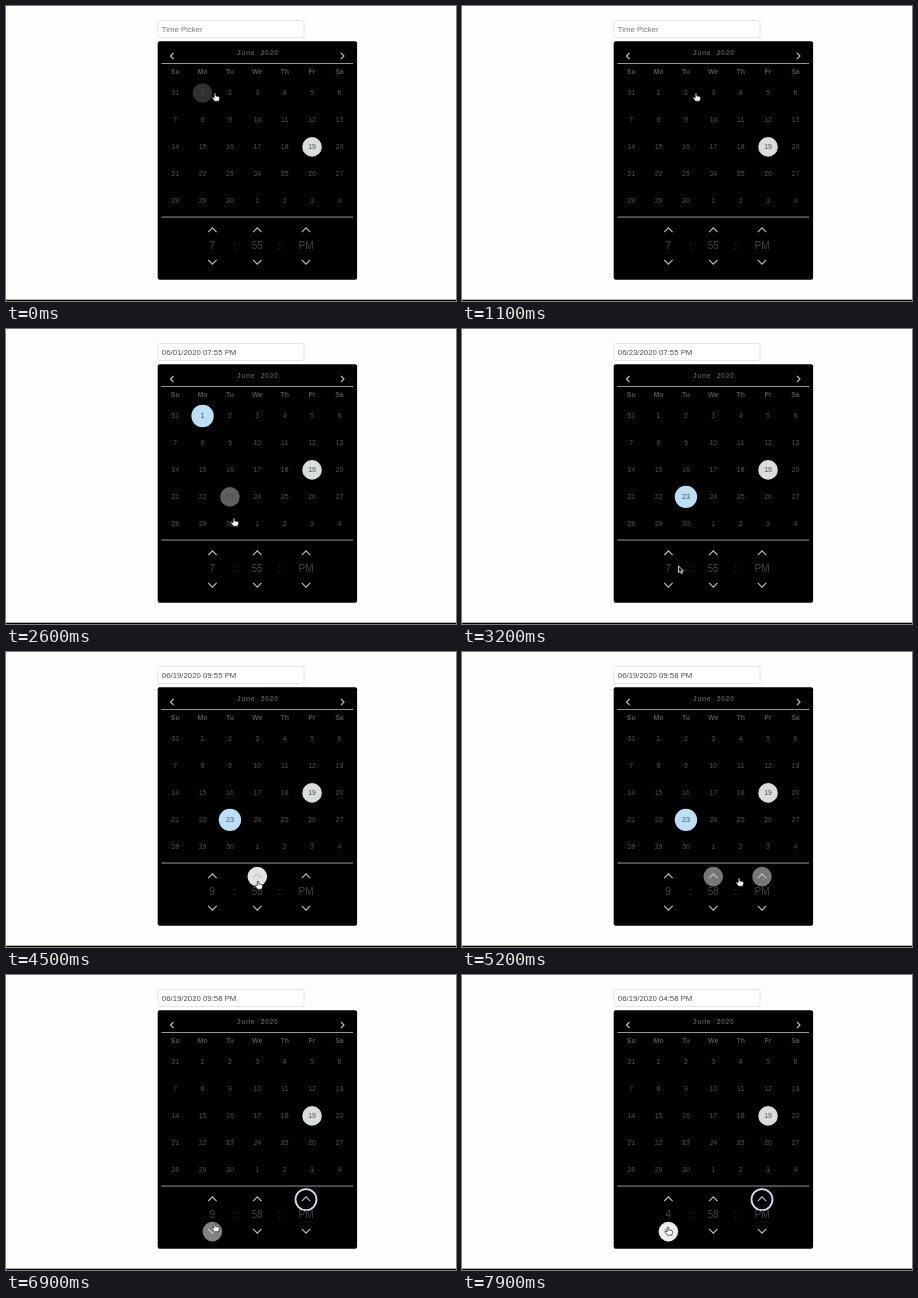
Animation, 450 px wide and 295 px high, one loop 8000 ms. Source, as an HTML page:

```html
<!DOCTYPE html>
<html lang="en">
<head>
<meta charset="utf-8">
<title>Time picker</title>
<style>
  html, body { margin: 0; width: 100%; height: 100%; overflow: hidden; background: #fefefe; }
  svg { display: block; width: 450px; height: 295px; }
  text { font: 7px "Liberation Sans", Arial, sans-serif; fill: #505050; text-anchor: middle; white-space: pre; }
  .bold { font-weight: bold; }
  .big { font-size: 10px; fill: #444; }
  #field { font-size: 7.8px; text-anchor: start; }
  .chevron { fill: none; stroke: #c4c4c4; stroke-width: 1.1; }
</style>
</head>
<body>
<svg id="stage" viewBox="0 0 450 295"></svg>
<script>
const stage = document.getElementById('stage');

function add(tag, attrs, label = '') {
  const el = document.createElementNS('http://www.w3.org/2000/svg', tag);
  for (const key in attrs) el.setAttribute(key, attrs[key]);
  el.textContent = label;
  stage.append(el);
  return el;
}
const text = (x, y, label, cls = '', extra = {}) => add('text', { x, y, class: cls, ...extra }, label);
const chevron = (x, y, dx, dy) => add('path', {
  class: 'chevron',
  d: dx ? `M${x - dx / 2} ${y - 3}l${dx} 3l${-dx} 3` : `M${x - 4.2} ${y - dy / 2}l4.2 ${dy}l4.2 ${-dy}`
});
const disc = (x, y, r, fill) => add('circle', { cx: x, cy: y, r, fill });

// Field, panel and rules
add('rect', { x: 152, y: 14.5, width: 146, height: 17, rx: 2, fill: '#fff', stroke: '#dcdfe2', 'stroke-width': .8 });
add('rect', { x: 151.7, y: 35.3, width: 199.4, height: 238.5, rx: 2 });
add('rect', { y: 293.7, width: 450, height: 1.3 });
for (const y of [57, 210.6]) add('rect', { x: 155.5, y, width: 191.5, height: .9, fill: '#a8a8a8' });

const column = i => 169.2 + i * 27.37;
const row = i => 87 + i * 26.95;
const [hourX, minuteX, halfX, upY, downY] = [206.4, 251.3, 300, 224.6, 256.6];

// Hover discs: [x, y, [time, opacity]...]
const hovers = [
  [column(1), row(0), [0, .2], [700, .2], [900, 0], [1300, 0], [1800, 1], [2400, 1], [2800, .2], [3000, 0]],
  [column(2), row(3), [2400, 0], [2900, 1], [3100, 1], [3500, 0]],
  [hourX, upY, [3200, 0], [3700, 1], [4100, 1], [4400, 0]],
  [minuteX, upY, [4100, 0], [4500, .95], [4700, 1], [5000, 1], [5400, 0]],
  [halfX, upY, [5000, 0], [5400, 1], [6100, 1], [6500, 0]],
  [hourX, downY, [6600, 0], [6900, .55], [7300, 1]]
].map(([x, y, ...keys]) => ({ el: disc(x, y, 9.8, '#eee'), keys }));

disc(column(5), row(2), 9.8, '#d8dcdb');

// Focus marks: shown from one time until another
const dayMark = (col, line, from, to) => ({ el: disc(column(col), row(line), 11.2, '#bcdff8'), from, to });
const marks = [dayMark(1, 0, 2000, 3000), dayMark(2, 3, 3000, 5600)];
const ring = disc(halfX, upY, 10.5, 'none');
ring.setAttribute('stroke', '#cfe3f5');
ring.setAttribute('stroke-width', 1.8);
marks.push({ el: ring, from: 5700, to: 8000 });

// Calendar
text(240, 49.2, 'June', 'bold', { 'font-size': 7, 'letter-spacing': .5 });
text(263.5, 49.2, '2020', 'bold', { 'letter-spacing': .5 });
['Su', 'Mo', 'Tu', 'We', 'Th', 'Fr', 'Sa'].forEach((day, i) => text(column(i), 68, day, 'bold'));
for (let i = 0; i < 35; i++) {
  const day = i === 0 ? 31 : (i - 1) % 30 + 1;
  text(column(i % 7), row(Math.floor(i / 7)) + 2.3, day);
}
chevron(166, 50, -3, 0);
chevron(336.5, 50, 3, 0);

// Time row
for (const x of [hourX, minuteX, halfX]) {
  chevron(x, 224, 0, -4.2);
  chevron(x, 256, 0, 4.2);
}
const hourText = text(hourX, 243.4, '', 'big');
const minuteText = text(minuteX, 243.4, '', 'big');
const halfText = text(halfX, 243.4, '', 'big');
for (const x of [229, 274]) text(x, 243.4, ':', 'big');
const field = text(155.8, 25.8, '', '', { id: 'field' });

// Pointer
const hand = add('path', {
  d: 'M-.8 .6Q0 -.6 .8 .6V3L3.8 3.6Q4.8 4 4.5 5.5L3.8 8.2H-.5L-3.2 4.8Q-3 3.5-1.8 4.2L-.8 5Z',
  fill: '#fff', stroke: '#222', 'stroke-width': .7
});
const arrow = add('path', {
  d: 'M0 0V6.6L1.6 5.2L2.8 7.6L4 7L2.9 4.8H5Z',
  fill: '#111', stroke: '#fff', 'stroke-width': .8
});
const path = [
  [0, 209, 87], [700, 209, 87], [900, 229, 87.5], [1000, 229, 87.5], [1100, 234, 87], [1400, 215, 86],
  [1700, 194.5, 84.5], [2000, 193.5, 84.5], [2200, 220, 100], [2400, 234, 150], [2600, 228, 189],
  [2900, 225, 168], [3000, 225, 171], [3200, 216.5, 237], [3400, 208, 225], [3700, 206, 223],
  [4100, 206, 224], [4400, 250, 228], [4500, 252, 229], [5000, 252, 228], [5400, 302, 224],
  [5800, 302.5, 225], [6100, 302.5, 225], [6400, 219, 232.5], [6700, 210, 246], [6900, 208.8, 248.5],
  [7300, 206, 252]
];

// Linear interpolation of one column of a key list
function sample(keys, t, col = 1) {
  const next = keys.findIndex(key => key[0] > t);
  if (next === 0) return keys[0][col];
  if (next < 0) return keys[keys.length - 1][col];
  const a = keys[next - 1], b = keys[next];
  return a[col] + (b[col] - a[col]) * (t - a[0]) / (b[0] - a[0]);
}
const clicks = (t, ...times) => times.filter(time => t >= time).length;

function draw(t) {
  for (const { el, keys } of hovers) el.setAttribute('opacity', sample(keys, t));
  for (const { el, from, to } of marks) el.setAttribute('opacity', +(t >= from && t < to));

  const hour = 7 + clicks(t, 3800, 4000) - clicks(t, 7400, 7500, 7700, 7800, 7900);
  const minute = 55 + clicks(t, 4700, 4800, 5000);
  const half = t >= 5900 && t < 6200 ? 'AM' : 'PM';
  const day = t < 2900 ? '01' : t < 3800 ? '23' : '19';
  hourText.textContent = hour;
  minuteText.textContent = minute;
  halfText.textContent = half;
  field.textContent = t < 1900 ? 'Time Picker' : `06/${day}/2020 0${hour}:${minute} ${half}`;
  field.style.fill = t < 1900 ? '#777' : '#495057';

  const x = sample(path, t, 1), y = sample(path, t, 2);
  const overLabels = y > 231 && y < 247;
  for (const [el, shown] of [[hand, !overLabels], [arrow, overLabels]]) {
    el.setAttribute('transform', `translate(${x} ${y})`);
    el.setAttribute('opacity', +shown);
  }
}

const start = performance.now();
function tick() {
  draw(Math.floor((performance.now() - start) % 8000 / 100) * 100);
  requestAnimationFrame(tick);
}
tick();
</script>
</body>
</html>
```
